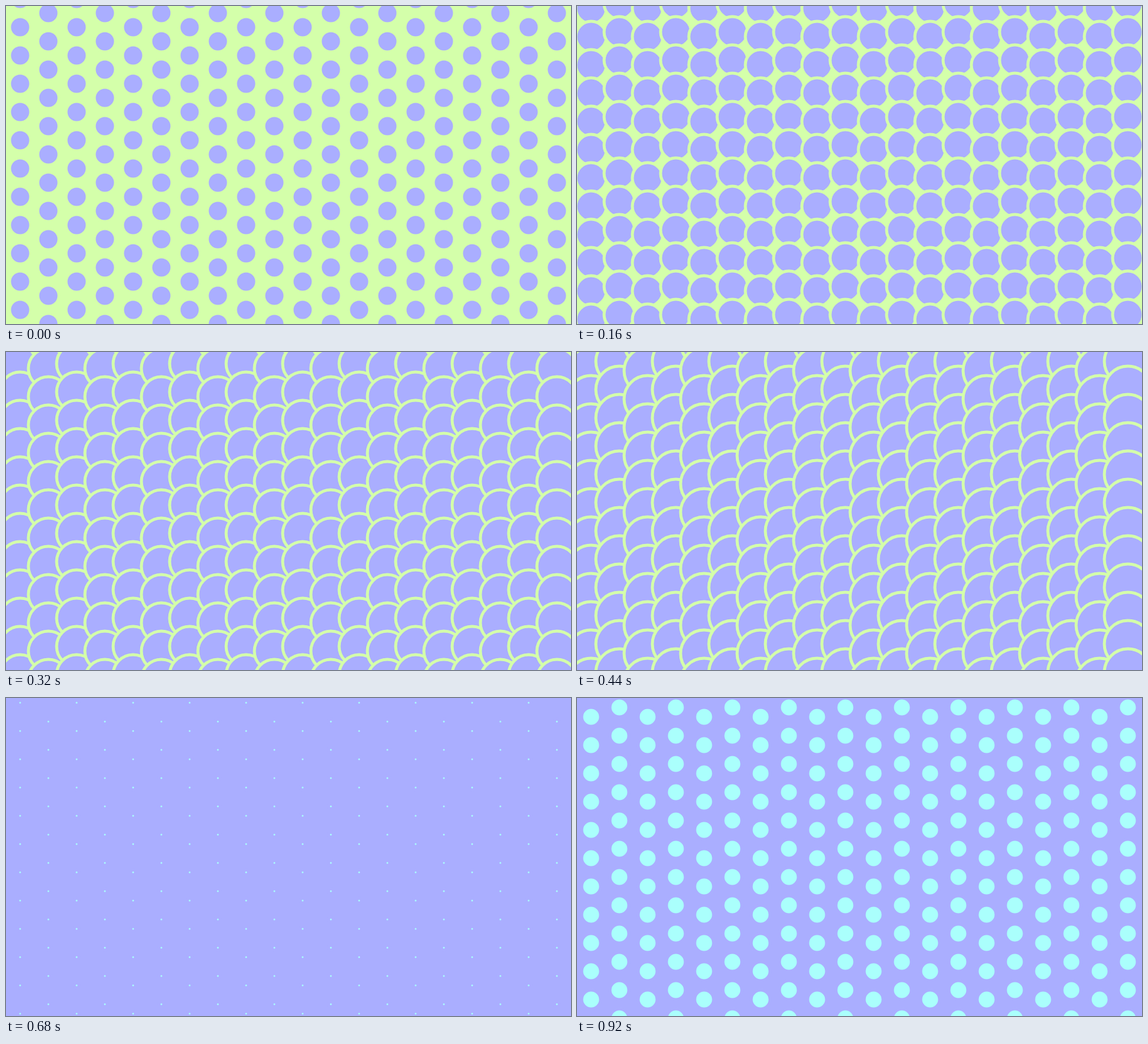
An HTML page with a canvas that plays this animation: 960x540 px, repeating every 0.96 s.

```html
<!DOCTYPE html>
<html lang="en">
<head>
<meta charset="utf-8">
<title>Drifting scales</title>
<style>
  html, body { margin: 0; width: 100%; height: 100%; overflow: hidden; background: #d4ffaa; }
  canvas { display: block; width: 960px; height: 540px; }
</style>
</head>
<body>
<canvas id="stage" width="960" height="540"></canvas>
<script>
  const W = 960, H = 540, CELL = 48;
  const STEP_MS = 40, STEPS = 24, SWAP = 15;
  const GREEN = '#d4ffaa', VIOLET = '#aaaeff', CYAN = '#aafffc';
  const ctx = document.getElementById('stage').getContext('2d');

  const mod = (a, n) => ((a % n) + n) % n;

  function disc(x, y, r) {
    ctx.beginPath();
    ctx.arc(x, y, r, 0, Math.PI * 2);
    ctx.fill();
    ctx.stroke();
  }

  function draw(step) {
    // Discs grow by 2px a step; at SWAP they restart in the next colour.
    const r = 2 * mod(step - SWAP, STEPS);
    const [back, front] = step < SWAP ? [GREEN, VIOLET] : [VIOLET, CYAN];
    ctx.fillStyle = back;
    ctx.fillRect(0, 0, W, H);
    if (r === 0) return;

    ctx.fillStyle = front;
    ctx.strokeStyle = back;
    ctx.lineWidth = 5;
    for (let col = 0; col < W / CELL; col++) {
      // Neighbouring columns drift in opposite directions.
      const shift = col % 2 ? 12 - 4 * step : 36 + 4 * step;
      for (let y = mod(shift, CELL) - 2 * CELL; y < H + 2 * CELL; y += CELL) {
        disc(CELL * (col + 0.5), y, r);
      }
    }
  }

  const start = performance.now();
  let last = -1;

  function tick() {
    const step = Math.floor((performance.now() - start) / STEP_MS) % STEPS;
    if (step !== last) draw(last = step);
    requestAnimationFrame(tick);
  }
  tick();
</script>
</body>
</html>
```
